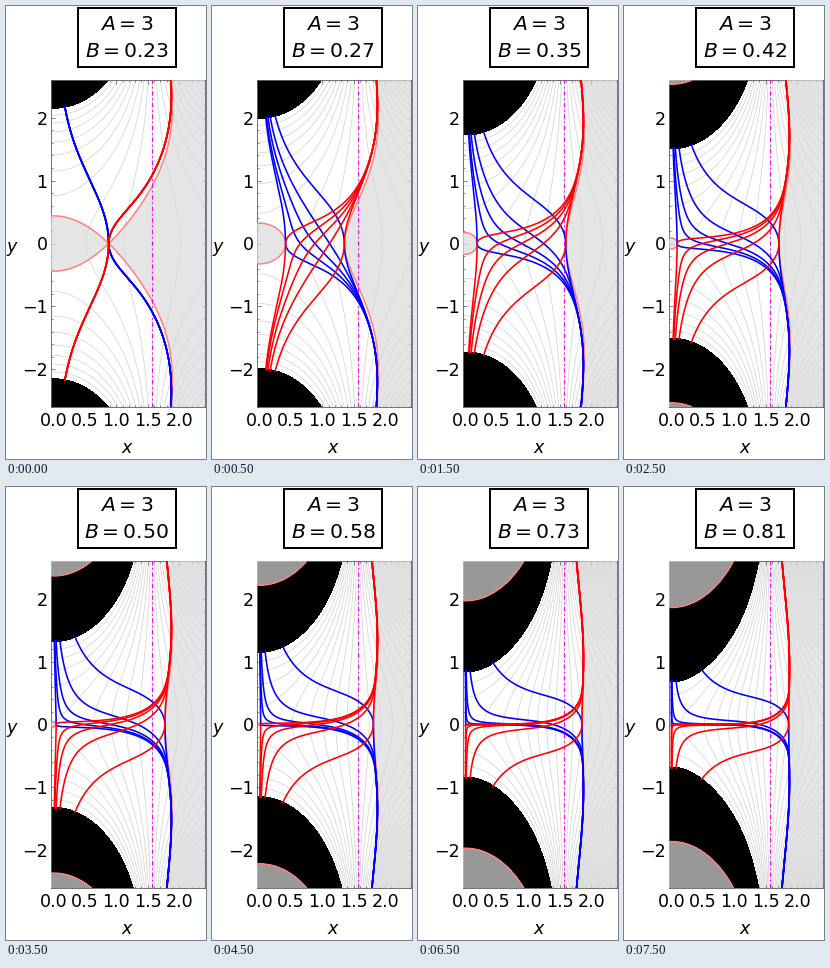
A matplotlib script for the animation above (8000 ms loop, 200 px wide and 453 px high).

```python
import numpy as np
import matplotlib.pyplot as plt
from matplotlib.animation import FuncAnimation
from matplotlib.patches import Rectangle
from matplotlib.ticker import MultipleLocator

W, H, DPI = 200, 453, 100
PX = 72 / DPI
A, FRAMES, CURVES = 3, 16, 5
X_MAX, Y_MAX = 3 * np.pi / 4, 2.5
LEFT, RIGHT, TOP, BOTTOM = 44.5, 198.5, 74, 401

plt.rcParams.update({"font.family": "DejaVu Sans",
                     "mathtext.fontset": "dejavusans"})


def potential(x, y, b):
    return b * np.cos(x) * np.cosh(y)


def gradient(x, y, b):
    return -b * np.sin(x) * np.cosh(y), b * np.cos(x) * np.sinh(y)


def excess(x, y, b):
    """Positive where the equation is elliptic (shaded), negative elsewhere."""
    return (1 - potential(x, y, b)) ** 4 - A * np.hypot(*gradient(x, y, b))


axis_x = np.linspace(0, 2.2, 20001)


def critical_b():
    lo, hi = 0.1, 0.5
    for _ in range(40):
        mid = (lo + hi) / 2
        if excess(axis_x, 0, mid).min() <= 0:
            hi = mid
        else:
            lo = mid
    return hi


def start_points(b):
    inside = axis_x[excess(axis_x, 0, b) <= 0]
    return np.linspace(inside[0], inside[-1], CURVES)


def direction(p, b):
    gx, gy = gradient(p[0], p[1], b)
    size = np.hypot(gx, gy)
    ratio = (1 - potential(p[0], p[1], b)) ** 4 / (A * size + 1e-12)
    phi = np.arctan2(gy, gx) - np.arcsin(np.clip(ratio, 0, 1))
    return np.array([np.cos(phi), np.sin(phi)])


def trace(start, b, step, length):
    """Runge-Kutta along the characteristics, cut off at the black region."""
    p, path = start, [start]
    for _ in range(int(length / abs(step))):
        k1 = direction(p, b)
        k2 = direction(p + step / 2 * k1, b)
        k3 = direction(p + step / 2 * k2, b)
        k4 = direction(p + step * k3, b)
        p = p + step / 6 * (k1 + 2 * k2 + 2 * k3 + k4)
        p = np.clip(p, -3.2, 3.2)
        path.append(p)
    path = np.array(path)
    u = potential(path[:, 0], path[:, 1], b)
    done = np.maximum.accumulate(u > 1.01, axis=0)
    return np.where(done[:, None], np.nan, path)


b_min = critical_b()
b_values = b_min + (1 - b_min) * np.arange(FRAMES) / 20
seeds = np.array([start_points(b) for b in b_values])
seeds = np.array([seeds, np.zeros_like(seeds)])
b_col = b_values[:, None]
up = trace(seeds, b_col, 0.006, 3.2)
down = trace(seeds, b_col, -0.006, 5.2)
paths = np.concatenate([up[::-1], down[1:]])

fig = plt.figure(figsize=(W / DPI, H / DPI), dpi=DPI, facecolor="white")
ax = fig.add_axes([LEFT / W, 1 - BOTTOM / H,
                   (RIGHT - LEFT) / W, (BOTTOM - TOP) / H])
x_lim = (-0.02 * X_MAX, 1.02 * X_MAX)
y_lim = (-1.04 * Y_MAX, 1.04 * Y_MAX)
ax.set(xlim=x_lim, ylim=y_lim)
ax.set_autoscale_on(False)

for axis, major, minor in ((ax.xaxis, 0.5, 0.1), (ax.yaxis, 1, 0.2)):
    axis.set_major_locator(MultipleLocator(major))
    axis.set_minor_locator(MultipleLocator(minor))
ax.xaxis.set_major_formatter("{x:.1f}")
ax.tick_params(which="both", direction="in", top=True, right=True,
               color="#555555", width=0.7 * PX, labelsize=17.5 * PX)
ax.tick_params(which="major", length=3.5 * PX)
ax.tick_params(which="minor", length=2 * PX)
ax.tick_params(axis="x", pad=4.5 * PX)
ax.tick_params(axis="y", pad=3 * PX)
for spine in ax.spines.values():
    spine.set(color="#666666", linewidth=0.9 * PX)


def label(x, y, text, size, **kw):
    return fig.text(x / W, 1 - y / H, text, fontsize=size * PX,
                    ha="center", **kw)


label(121, 442, "x", 17.5, style="italic", va="center")
label(6, 241, "y", 17.5, style="italic", va="center")
label(121, 24, "$A = 3$", 20.4, va="baseline")
b_text = label(121, 51, "", 20.4, va="baseline")
fig.add_artist(Rectangle((72 / W, 1 - 61 / H), 98 / W, 59 / H, fill=False,
                         edgecolor="black", linewidth=2 * PX))

ax.axvline(np.pi / 2, color="magenta", linewidth=1.1 * PX,
           linestyle=(0, (4, 2.5, 1.5, 2.5)), zorder=4)


def curve(color, zorder):
    return ax.plot([], [], color=color, linewidth=1.6 * PX, zorder=zorder)[0]


blue = [curve("blue", 5) for _ in range(CURVES)]
red = [curve("red", 6) for _ in range(CURVES)]

gx, gy = np.meshgrid(np.linspace(*x_lim, 246), np.linspace(*y_lim, 521))
regions = []


def draw(i):
    b = b_values[i]
    while regions:
        regions.pop().remove()
    u = potential(gx, gy, b)
    w = excess(gx, gy, b)
    regions.extend([
        ax.contour(gx, gy, u, levels=np.arange(-50, 11) / 10,
                   colors="#d6d6d6", linestyles="solid",
                   linewidths=0.8 * PX, zorder=1),
        ax.contourf(gx, gy, u, levels=[1, 1e3], colors="black", zorder=2),
        ax.contourf(gx, gy, w, levels=[0, 1e6], colors=["#dadada"],
                    alpha=0.7, zorder=3),
        ax.contour(gx, gy, w, levels=[0], colors="#ff8080",
                   linewidths=1.5 * PX, zorder=3.5),
    ])
    for k in range(CURVES):
        x, y = paths[:, 0, i, k], paths[:, 1, i, k]
        blue[k].set_data(x, y)
        red[k].set_data(x, -y)
    b_text.set_text(f"$B = {b:.2f}$")
    return blue + red


anim = FuncAnimation(fig, draw, frames=FRAMES, init_func=lambda: draw(0),
                     interval=500, repeat=True, repeat_delay=0, blit=False)
plt.show()
```
